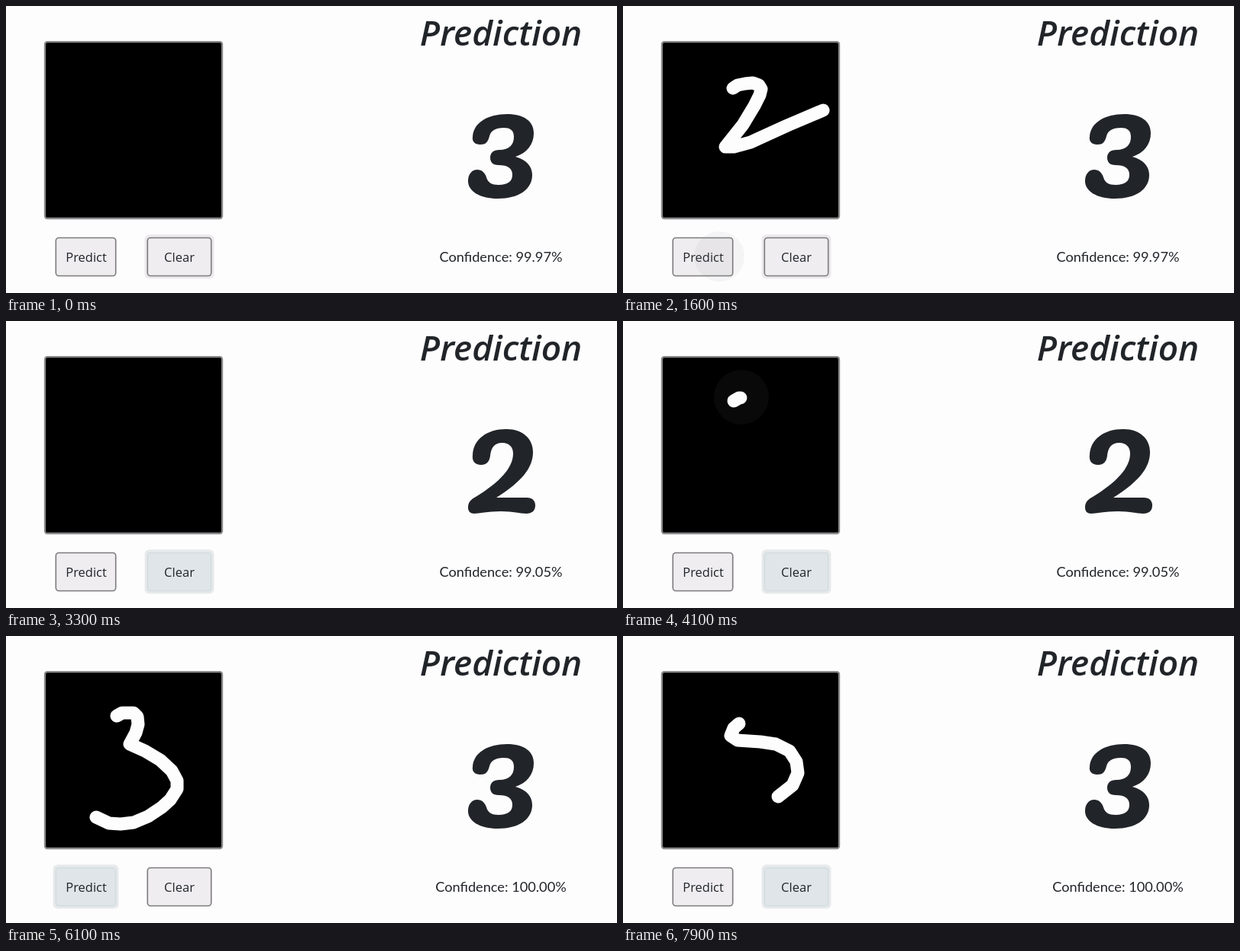
An HTML page that plays this animation: 800 by 377 pixels, repeating every 8000 ms.

```html
<!DOCTYPE html>
<html lang="en">
<head>
<meta charset="utf-8">
<title>Digit prediction</title>
<style>
html, body { margin: 0; width: 100%; height: 100%; overflow: hidden; background: #fefdfe; }
svg { display: block; width: 800px; height: 377px; }
text { fill: #212529; text-anchor: middle; }
.title { font: italic 600 46px "Open Sans", sans-serif; }
.label { font: 16.5px "Open Sans", sans-serif; }
.confidence { font: 18.2px Lato, sans-serif; }
.digit { fill: #212529; }
.pen { fill: none; stroke: #fefdfe; stroke-width: 17; stroke-linecap: round; stroke-linejoin: round; }
.face { fill: #efedef; stroke: #7c7b7d; stroke-width: 1.6; }
.ring { fill: #ebe9ec; visibility: hidden; }
.focus .ring { visibility: visible; }
.active .ring { fill: #e7eaeb; }
.active .face { fill: #dfe5e8; stroke: #d3dcdf; }
</style>
</head>
<body>
<svg viewBox="0 0 800 377">
  <text class="title" x="648" y="52">Prediction</text>
  <rect x="51" y="47.2" width="232" height="231.8" rx="3" stroke="#89888a" stroke-width="2.3"/>
  <g id="predict">
    <rect class="ring" x="61.5" y="300.3" width="86" height="58" rx="6"/>
    <rect class="face" x="65.3" y="304.5" width="78.4" height="50" rx="4"/>
    <text class="label" x="105" y="336">Predict</text>
  </g>
  <g id="clear">
    <rect class="ring" x="181.5" y="300.3" width="91" height="58" rx="6"/>
    <rect class="face" x="185.3" y="304.5" width="83.4" height="50" rx="4"/>
    <text class="label" x="227" y="336">Clear</text>
  </g>
  <circle id="touch" fill="#827d82"/>
  <path class="pen" pathLength="1" d="M144 108L150 104 160 102 170 101 178 104 181 109 179 117 172 131 157 156 134 185 145 185 167 179 180 173 215 157 262 137"/>
  <path class="pen" pathLength="1" d="M145 105L152 101 167 101 172 106 173 116 170 127 162 142 182 151 202 163 217 177 224 190 224 201 215 215 204 225 186 237 167 245 150 247 135 246 118 238"/>
  <path class="pen" pathLength="1" d="M152 115L145 121 141 131 150 137 180 139 200 142 218 151 227 165 229 180 222 196 203 211"/>
  <path id="two" class="digit" d="M611 176C612 155 630 142 655 142C677 142 690 155 690 172C690 192 677 210 642 232H682C689 232 693 236 693 242C693 249 689 253 681 253C672 253 665 250 648 250C630 250 620 253 613 253C608 253 605 250 605 245C605 238 609 234 615 231C646 212 664 193 664 174C664 165 658 160 650 160C639 160 635 167 634 177C633 185 629 189 622 189C614 189 610 184 611 176Z"/>
  <path id="three" class="digit" d="M611 172C612 153 631 142 656 142C679 142 691 152 691 167C691 182 682 193 667 198C682 202 689 211 689 222C689 241 671 253 644 253C620 253 605 243 605 230C605 221 610 215 617 215C623 215 627 219 629 225C631 232 636 235 645 235C657 235 663 230 663 222C663 213 657 209 645 209C637 209 634 205 634 199C634 193 638 189 646 189C659 189 665 182 665 172C665 163 660 160 652 160C640 160 635 164 633 171C631 179 628 182 621 182C614 182 610 178 611 172Z"/>
  <text id="confidence" class="confidence" x="648" y="336"></text>
</svg>
<script>
const LOOP = 8000, STEP = 100;
const $ = id => document.getElementById(id);
const pens = document.querySelectorAll(".pen");

// Each stroke is drawn from start to end and wiped at clear.
const strokes = [
  { start: 300, end: 600, clear: 3200 },
  { start: 4100, end: 4700, clear: 6900 },
  { start: 7500, end: 7900, clear: LOOP }
];
const touches = [
  { at: 1600, x: 126, y: 329, r: 33 },
  { at: 4100, x: 155, y: 100, r: 36 },
  { at: 5400, x: 126, y: 329, r: 33 }
];
const results = [
  { at: 0, digit: "three", score: "99.97%" },
  { at: 1900, digit: "two", score: "99.05%" },
  { at: 5800, digit: "three", score: "100.00%" }
];
const buttons = [
  { at: 0, id: "clear", style: "focus" },
  { at: 1700, id: "predict", style: "focus active" },
  { at: 3200, id: "clear", style: "focus active" },
  { at: 5500, id: "predict", style: "focus active" },
  { at: 6900, id: "clear", style: "focus active" }
];

const latest = (list, t) => list.filter(item => item.at <= t).pop();

function render(t) {
  strokes.forEach(({ start, end, clear }, i) => {
    const progress = Math.min(1, 0.035 + 0.965 * (t - start) / (end - start));
    pens[i].style.visibility = t >= start && t < clear ? "visible" : "hidden";
    pens[i].style.strokeDasharray = progress < 1 ? `${Math.max(0, progress)} 2` : "none";
  });

  const { digit, score } = latest(results, t);
  for (const id of ["two", "three"]) $(id).style.visibility = id === digit ? "visible" : "hidden";
  $("confidence").textContent = "Confidence: " + score;

  const { id, style } = latest(buttons, t);
  for (const name of ["predict", "clear"]) $(name).setAttribute("class", name === id ? style : "");

  const touch = latest(touches, t);
  const fade = touch ? Math.max(0, 1 - (t - touch.at) / 300) : 0;
  $("touch").setAttribute("opacity", 0.07 * fade);
  if (touch) {
    $("touch").setAttribute("cx", touch.x);
    $("touch").setAttribute("cy", touch.y);
    $("touch").setAttribute("r", touch.r);
  }
}

const origin = performance.now();
function tick() {
  const t = (performance.now() - origin) % LOOP;
  render(Math.floor(t / STEP) * STEP);
  requestAnimationFrame(tick);
}
tick();
</script>
</body>
</html>
```
